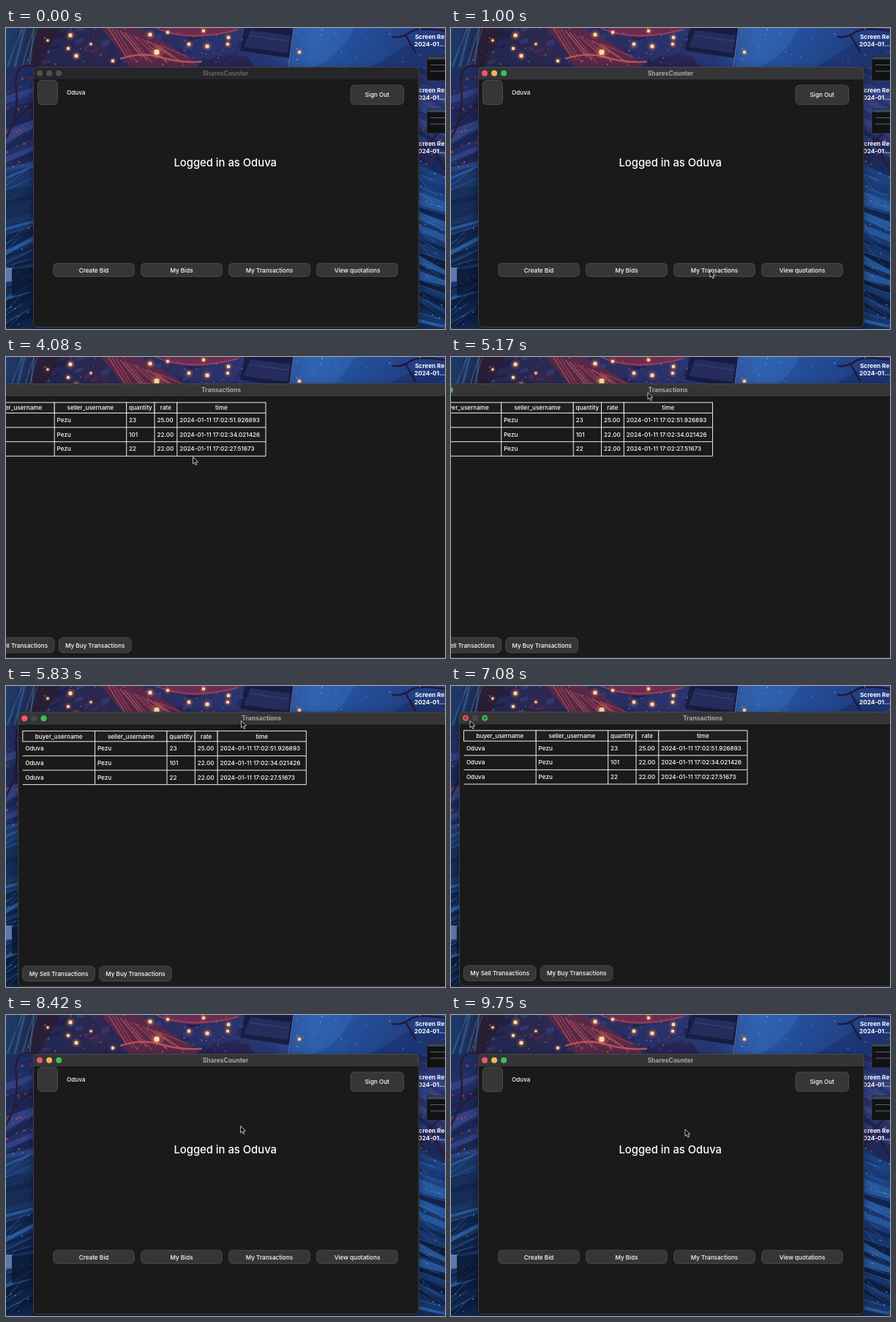
An HTML page for the animation above (9830 ms loop, 600 by 411 pixels).

```html
<!DOCTYPE html>
<html>
<head>
<meta charset="utf-8">
<style>
html, body { margin: 0; width: 100%; height: 100%; overflow: hidden; background: #10183a; }
svg { display: block; width: 600px; height: 411px; }
text { font-family: Inter, Roboto, sans-serif; font-size: 8.15px; font-weight: 500; fill: #fff; }
.title { font-size: 8.5px; font-weight: 700; text-anchor: middle; }
.mid { text-anchor: middle; }
.label { font-size: 8.2px; font-weight: 700; }
.win { filter: drop-shadow(0 4px 6px rgba(0,0,0,.4)); }
</style>
</head>
<body>
<svg id="stage" viewBox="0 0 600 411" xmlns="http://www.w3.org/2000/svg">
  <defs>
    <linearGradient id="sky">
      <stop offset="0" stop-color="#1d3c6c"/>
      <stop offset=".08" stop-color="#252a52"/>
      <stop offset=".2" stop-color="#2c2850"/>
      <stop offset=".42" stop-color="#2b3068"/>
      <stop offset=".6" stop-color="#2a3a78"/>
      <stop offset=".7" stop-color="#2a5cab"/>
      <stop offset=".8" stop-color="#24509c"/>
      <stop offset="1" stop-color="#22397c"/>
    </linearGradient>
    <linearGradient id="depth" x2="0" y2="1">
      <stop offset="0" stop-color="#0b1430" stop-opacity="0"/>
      <stop offset=".5" stop-color="#15386f" stop-opacity=".45"/>
      <stop offset="1" stop-color="#0c2348" stop-opacity=".75"/>
    </linearGradient>
    <radialGradient id="glow">
      <stop offset="0" stop-color="#ffb46a" stop-opacity=".6"/>
      <stop offset="1" stop-color="#e0503c" stop-opacity="0"/>
    </radialGradient>
  </defs>
  <g id="wall"></g>
  <g id="home" class="win"></g>
  <g id="trans" class="win"></g>
  <path id="cursor" d="M0 0V9.4L2.2 7.4L3.8 11L5.4 10.3L3.9 6.8H6.9Z" fill="#080808" stroke="#e8e8e8" stroke-width=".8" stroke-linejoin="round"/>
</svg>
<script>
const LOOP = 9830, STEP = 1000 / 12;
const USER = 'Oduva', SELLER = 'Pezu', APP = 'SharesCounter';
const $ = id => document.getElementById(id);

function el(parent, tag, attrs, content) {
  const n = document.createElementNS('http://www.w3.org/2000/svg', tag);
  for (const k in attrs) n.setAttribute(k, attrs[k]);
  if (content) n.textContent = content;
  parent.appendChild(n);
  return n;
}
const rect = (p, x, y, width, height, fill, more) =>
  el(p, 'rect', { x, y, width, height, fill, ...more });
const path = (p, d, fill, more) => el(p, 'path', { d, fill, ...more });
const stroke = (p, d, color, width, opacity = 1) =>
  path(p, d, 'none', { stroke: color, 'stroke-width': width, opacity });
const text = (p, x, y, s, cls = '', more) => el(p, 'text', { x, y, class: cls, ...more }, s);
const dot = (p, cx, cy, r, fill, more) => el(p, 'circle', { cx, cy, r, fill, ...more });

let seed = 7;
const rnd = (a, b) => {
  seed = (seed * 16807) % 2147483647;
  return a + (b - a) * seed / 2147483647;
};
const pick = list => list[Math.floor(rnd(0, list.length))];

function drawSky(g) {
  rect(g, 0, 0, 600, 411, 'url(#sky)');
  rect(g, 0, 0, 600, 411, 'url(#depth)');

  // dim town along the top
  for (let i = 0; i < 60; i++) {
    const x = rnd(50, 320), y = rnd(-6, 50), w = rnd(6, 22), h = rnd(3, 9);
    path(g, `M${x} ${y}l${w} ${-w * .25}v${h}l${-w} ${w * .25}z`,
      pick(['#1a1d42', '#40284f', '#38417e', '#5a2f55', '#20265a']), { opacity: .6 });
  }
  path(g, 'M36 0H74L62 22L44 53H26Z', '#2a1d31', { opacity: .85 });
  for (let i = 0; i < 7; i++)
    stroke(g, `M${2 + i * 5} 53L${rnd(8, 24) + i * 4} 0`, pick(['#3a6a9c', '#162a50', '#12223f']), rnd(1, 3), .6);

  // striped roof and its eaves
  path(g, 'M130 0H180L214 18L250 40L262 53H168L160 36Z', '#582848');
  for (let i = 0; i < 13; i++)
    stroke(g, `M${138 + i * 6} ${i * 2.2 - 3}L${165 + i * 7} ${40 + i % 3 * 4}`, pick(['#b54a56', '#863351', '#d3685f']), 1.2, .7);
  stroke(g, 'M156 42Q186 32 212 40T268 46', '#c95a58', 2.5, .85);
  path(g, 'M212 0H320L300 8L258 13L226 9Z', '#6b2c52');
  stroke(g, 'M205 0Q250 20 318 2', '#b8465a', 1.5, .8);
  path(g, 'M262 53L285 39H330L340 53Z', '#272551');

  // dark block beside the open sky
  path(g, 'M326 0H393L387 41L320 31Z', '#171d42');
  path(g, 'M334 3L389 10L385 34L325 26Z', '#262d5c');
  stroke(g, 'M333 10L386 18', '#3c447c', 1);
  stroke(g, 'M393 0L386 53', '#6c80c4', .8);
  path(g, 'M394 0H476Q456 40 420 53H388Z', '#3c78c8', { opacity: .3 });
  path(g, 'M500 53L556 18L600 24V53Z', '#1b2f6c', { opacity: .6 });
  stroke(g, 'M528 12Q542 14 552 6T600 4M545 8L560 34', '#23183a', 2.5);
}

function drawLamps(g) {
  const lamps = [[206, 33, 3.5], [197, 9, 2.6], [250, 22, 2.2], [275, 25, 2.6], [304, 13, 2.2], [303, 22, 2], [88, 10, 2.6],
    [85, 28, 2], [96, 38, 2.5], [57, 17, 1.5], [221, 6, 2], [270, 4, 2], [401, 33, 2], [146, 45, 2], [116, 22, 1.5]];
  for (const [x, y, r] of lamps) {
    dot(g, x, y, r * 3, 'url(#glow)');
    rect(g, x - r, y - r, r * 2, r * 2, '#ffdca0', { rx: r * .6 });
  }
  for (let i = 0; i < 70; i++)
    dot(g, rnd(30, 330), rnd(0, 52), rnd(.3, 1), pick(['#ff9b70', '#d8576a', '#7fa0e0', '#ffd0a0']), { opacity: .6 });
  for (let i = 0; i < 30; i++)
    dot(g, rnd(395, 600), rnd(0, 52), rnd(.3, .9), '#8fc4ff', { opacity: .7 });
}

function drawEdges(g) {
  for (const x of [0, 564]) {
    const flip = x ? -1 : 1;
    rect(g, x, 54, 38, 130, x ? '#2b3c7c' : '#1e2d5e');
    for (let y = 60; y < 411; y += 9) {
      const lift = flip * rnd(4, 12), h = rnd(3, 13);
      const fill = y < 190 ? pick(['#242f68', '#1a2450', '#34498c']) : pick(['#0d2146', '#1d4684', '#2a62a8', '#0b1936', '#183a72']);
      path(g, `M${x} ${y + lift}L${x + 38} ${y - lift}v${h}L${x} ${y + lift + h}z`, fill, { opacity: .75 });
      if (y > 200) stroke(g, `M${x} ${y + lift}L${x + rnd(12, 38)} ${y - lift}`, '#5292d4', .7, .55);
    }
    for (let i = 0; i < 34; i++)
      dot(g, x + rnd(0, 37), rnd(65, 190), rnd(.6, 2), pick(['#8c2f4a', '#b34350', '#54274a']), { opacity: .7 });
    for (let i = 0; i < 34; i++)
      dot(g, x + rnd(0, 37), rnd(180, 408), rnd(.4, 1.1), '#62b4f6', { opacity: .7 });
  }
  stroke(g, 'M0 150Q18 120 14 84T34 52M8 130L36 104', '#2a1a34', 2.5);
  stroke(g, 'M600 138Q580 148 564 178M600 195L576 150', '#2a1a36', 2.5);
  path(g, 'M0 222L38 214V262L0 272Z', '#14264a', { opacity: .7 });
  rect(g, 0, 327, 8, 19, '#5f78ae');
  path(g, 'M8 330L38 326V358L8 366Z', '#0a1730', { opacity: .8 });
  rect(g, 0, 409, 600, 2, '#152a52');
}

function drawFiles(g) {
  for (const y of [38, 110]) {
    rect(g, 575, y, 30, 34, '#111214', { stroke: '#4c4e58', 'stroke-width': .6 });
    rect(g, 576, y + 1, 30, 4, '#38445f');
    rect(g, 580, y + 12, 20, 1, '#606066');
    rect(g, 580, y + 20, 20, 2, '#3c3c40');
  }
  for (const y of [15, 88, 161]) {
    text(g, 559, y, 'Screen Re', 'label');
    text(g, 558, y + 10, '2024-01...', 'label');
  }
}

function frame(g, x, y, w, h, title, cx) {
  rect(g, x, y, w, h, '#1a1a1b', { rx: 6 });
  const bar = path(g, `M${x} ${y + 18}v-12q0 -6 6 -6h${w - 12}q6 0 6 6v12z`, '#363638');
  rect(g, x, y + 17.6, w, .8, '#0c0c0d');
  rect(g, x + .4, y + .4, w - .8, h - .8, 'none', { rx: 6, stroke: '#505054', 'stroke-width': .8 });
  const name = text(g, cx, y + 11.7, title, 'title');
  const dots = [0, 1, 2].map(i => dot(g, x + 9 + i * 13.1, y + 8.7, 4, '#555'));
  return { bar, name, dots };
}

function button(g, x, y, w, h, label, r = 5) {
  rect(g, x, y, w, h, '#363637', { rx: r, stroke: '#545456', 'stroke-width': .8 });
  if (label) text(g, x + w / 2, y + h / 2 + 3.2, label, 'mid');
}

function drawHome(g) {
  const f = frame(g, 37, 53, 527.5, 356, APP, 300);
  button(g, 43.5, 71.5, 27, 33, '');
  text(g, 83, 91, USER);
  button(g, 471, 78, 72.5, 26.3, 'Sign Out');
  text(g, 299.7, 189, 'Logged in as ' + USER, 'mid', { style: 'font-size:14.8px;font-weight:450' });
  ['Create Bid', 'My Bids', 'My Transactions', 'View quotations'].forEach((s, i) =>
    button(g, 64.7 + i * 120, 321.3, 110.6, 18, s));
  return f;
}

function drawTable(g, cols, rows) {
  const names = ['buyer_username', 'seller_username', 'quantity', 'rate', 'time'];
  const line = { stroke: '#ededed', 'stroke-width': 1 };
  const end = cols[5];
  names.forEach((s, i) => {
    const w = cols[i + 1] - cols[i];
    rect(g, cols[i], 60.8, w, 14.4, '#1f1f20', line);
    text(g, cols[i] + w / 2, 71, s, 'mid');
  });
  rows.forEach((row, r) => {
    const y = 75.2 + r * 19.6;
    path(g, `M${cols[0]} ${y + 19.6}H${end}`, 'none', line);
    row.forEach((s, i) => {
      text(g, cols[i] + 3.4, y + 12.6, s);
      path(g, `M${cols[i + 1]} ${y}v19.6`, 'none', line);
    });
  });
}

function drawTrans(g) {
  const f = frame(g, 11, 35, 664, 375, 'Transactions', 344);
  f.marks = stroke(g, 'M18.2 41.9l3.6 3.6m0 -3.6l-3.6 3.6M44.6 42.1l3.2 3.2m0 -3.2l-3.2 3.2', '#3a1520', .9);
  f.empty = el(g, 'g', {});
  f.full = el(g, 'g', {});
  drawTable(f.empty, [17.5, 83.3, 182, 280.8, 346.3, 412], []);
  drawTable(f.full, [17.5, 116.2, 214.7, 253, 283.8, 405], [
    ['23', '25.00', '51.926893'], ['101', '22.00', '34.021426'], ['22', '22.00', '27.51673']
  ].map(([n, rate, s]) => [USER, SELLER, n, rate, '2024-01-11 17:02:' + s]));
  button(g, 17.3, 381.8, 98.8, 20.6, 'My Sell Transactions', 6);
  button(g, 122.3, 381.8, 98.8, 20.6, 'My Buy Transactions', 6);
  return f;
}

[drawSky, drawLamps, drawEdges, drawFiles].forEach(draw => draw($('wall')));
const home = drawHome($('home')), trans = drawTrans($('trans'));

// [time, x, y]
const mouse = [[160, 334, 416], [680, 354, 331], [1080, 354, 331], [1830, 47.5, 391], [2420, 47.5, 391],
  [2700, 118, 392], [3080, 118, 392], [3830, 255.5, 136.5], [4330, 255.5, 136.5], [4920, 266.5, 48.5],
  [5080, 266.5, 48.5], [5750, 321.5, 47.5], [6080, 321.5, 47.5], [6250, 316, 47], [6340, 316, 47], [6920, 26, 47.5],
  [7080, 26, 47.5], [7250, 20, 43], [7420, 20, 43], [8250, 320.5, 151.5], [8920, 320.5, 151.5], [9330, 320, 156]];
const drag = [[5080, -50, 1.3], [5750, 5.3, .6], [6080, 5.3, .6], [6250, 0, 0]];

function along(keys, t) {
  let a = keys[0];
  for (const b of keys) {
    if (t < b[0]) {
      if (b === a) break;
      const u = (t - a[0]) / (b[0] - a[0]), e = u * u * (3 - 2 * u);
      return [a[1] + (b[1] - a[1]) * e, a[2] + (b[2] - a[2]) * e];
    }
    a = b;
  }
  return [a[1], a[2]];
}
const ramp = (t, a, b) => Math.max(0, Math.min(1, (t - a) / (b - a)));
const show = (n, on) => n.setAttribute('display', on ? 'inline' : 'none');

function paint(w, active, colors) {
  w.bar.setAttribute('fill', active ? '#353537' : '#262628');
  w.name.setAttribute('style', 'fill:' + (active ? '#a8a8ab' : '#666669'));
  w.dots.forEach((d, i) => d.setAttribute('fill', active ? colors[i] : '#505052'));
}

function render(ms) {
  const t = Math.floor((ms % LOOP + 5) / STEP) * STEP;
  const [mx, my] = along(mouse, t);
  $('cursor').setAttribute('transform', `translate(${mx} ${my})`);
  show($('cursor'), t > 160);

  paint(home, t > 740 && (t < 1080 || t > 7400), ['#f4566a', '#f2b655', '#38c455']);

  const [dx, dy] = along(drag, t);
  const open = ramp(t, 1000, 1250) * (1 - ramp(t, 7330, 7500));
  const s = .94 + .06 * open;
  show($('trans'), open > 0);
  $('trans').setAttribute('opacity', open);
  $('trans').setAttribute('transform', `translate(${dx + 343 * (1 - s)} ${dy + 222 * (1 - s)}) scale(${s})`);
  const hover = t > 6800 && mx < 54 && my < 53;
  paint(trans, true, hover ? ['#e2536c', '#48484a', '#35b455'] : ['#f4566a', '#48484a', '#38c455']);
  show(trans.marks, hover);
  show(trans.empty, t < 2990);
  show(trans.full, t > 2990);
}

function tick() {
  render(performance.now());
  requestAnimationFrame(tick);
}
tick();
</script>
</body>
</html>
```
